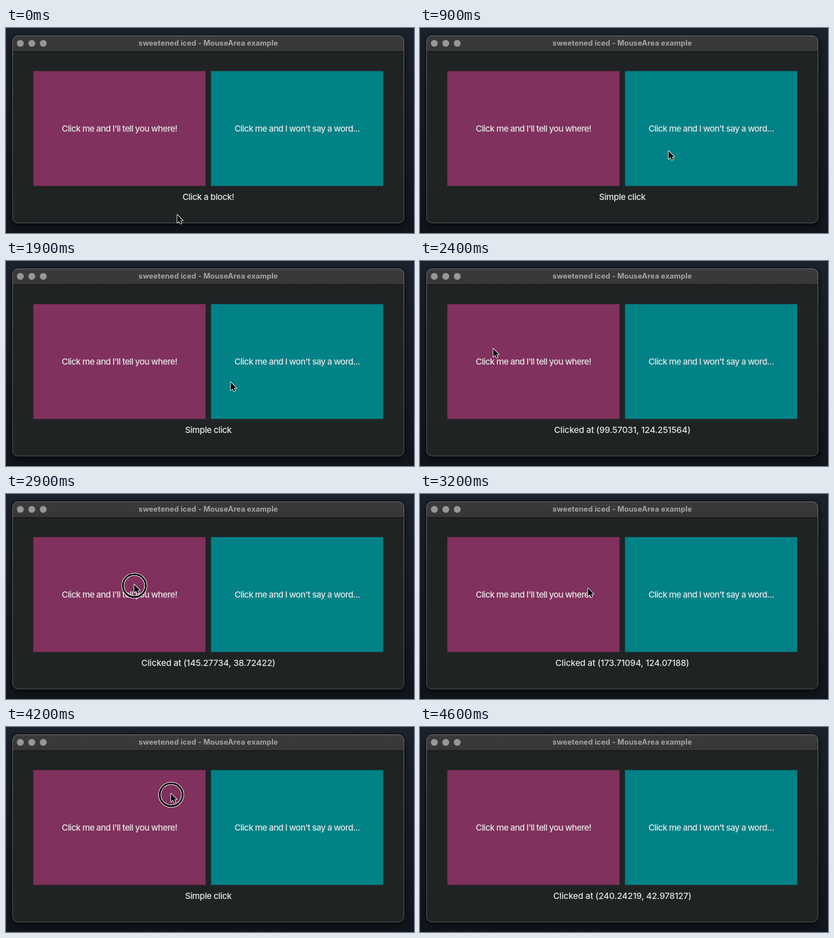
An HTML page with a canvas for the animation above (5.02 s loop, 712x360 px).

```html
<!DOCTYPE html>
<html lang="en">
<head>
<meta charset="utf-8">
<title>MouseArea example</title>
<style>
  html, body { margin: 0; width: 100%; height: 100%; overflow: hidden; background: #181d27; }
  canvas { display: block; width: 712px; height: 360px; }
</style>
</head>
<body>
<canvas id="stage"></canvas>
<script>
const W = 712, H = 360, LOOP = 5020;
const STEP = 100, TRAVEL = 300;
const canvas = document.getElementById('stage');
const ctx = canvas.getContext('2d');
const dpr = window.devicePixelRatio || 1;
canvas.width = W * dpr;
canvas.height = H * dpr;

const left = {
  x: 48, y: 76, color: '#80315d', text: "Click me and I'll tell you where!",
  reply: (x, y) => `Clicked at (${x}, ${y})`
};
const right = {
  x: 358, y: 76, color: '#018287', text: "Click me and I won't say a word...",
  reply: () => 'Simple click'
};

const move = (t, x, y) => ({ t, x, y });
const drag = (t, x, y) => ({ t, x, y, press: true });
const click = (t, block, x, y) =>
  ({ t, x: block.x + x, y: block.y + y, press: true, note: block.reply(x, y) });

// Where the pointer has to be, and when
const stops = [
  move(0, 299, 330),
  click(800, right, 76, 142),
  click(1400, right, 73, 36),
  click(1600, right, 120, 144),
  click(2100, left, 99.57031, 124.251564),
  move(2400, 128, 156),
  move(2500, 68, 121),
  click(2700, left, 145.27734, 38.72422),
  drag(2900, 224, 161),
  click(3100, left, 173.71094, 124.07188),
  move(3300, 365, 135),
  move(3700, 365, 135),
  move(3800, 451, 93),
  click(3900, right, 97, 31),
  click(4200, left, 240.24219, 42.978127),
  move(4500, 312, 89)
];

const clamp = v => Math.min(1, Math.max(0, v));
const smooth = k => k * k * (3 - 2 * k);
const mix = (a, b, k) => a + (b - a) * k;

function label(text, x, y, font, color, spacing) {
  ctx.font = font + ' Inter, "Open Sans", sans-serif';
  ctx.letterSpacing = spacing + 'px';
  ctx.fillStyle = color;
  ctx.textAlign = 'center';
  ctx.textBaseline = 'alphabetic';
  ctx.fillText(text, x, y);
}

const bodyText = (text, x, y, spacing) => label(text, x, y, '500 15px', '#e6e6e6', spacing);

function roundRect(x, y, w, h, r) {
  ctx.beginPath();
  ctx.roundRect(x, y, w, h, r);
}

function circle(x, y, r) {
  ctx.beginPath();
  ctx.arc(x, y, r, 0, Math.PI * 2);
}

function vertical(y0, y1, from, to) {
  const g = ctx.createLinearGradient(0, y0, 0, y1);
  g.addColorStop(0, from);
  g.addColorStop(1, to);
  return g;
}

function drawWindow() {
  ctx.fillStyle = vertical(0, H, '#1b222d', '#12151d');
  ctx.fillRect(0, 0, W, H);

  ctx.save();
  ctx.shadowColor = 'rgba(0,0,0,.6)';
  ctx.shadowBlur = 14 * dpr;
  ctx.shadowOffsetY = 5 * dpr;
  ctx.fillStyle = '#202324';
  roundRect(11, 13, 684, 330, 10);
  ctx.fill();
  ctx.restore();

  ctx.save();
  roundRect(11, 13, 684, 330, 10);
  ctx.clip();
  ctx.fillStyle = vertical(13, 41, '#3b3b3b', '#363636');
  ctx.fillRect(11, 13, 684, 28);
  ctx.fillStyle = '#0c0d0d';
  ctx.fillRect(11, 41, 684, 1);
  ctx.restore();

  ctx.lineWidth = 1;
  ctx.strokeStyle = '#05070a';
  roundRect(10.5, 12.5, 685, 331, 10.5);
  ctx.stroke();
  ctx.strokeStyle = vertical(13, 343, '#747474', '#58595a');
  roundRect(11.5, 13.5, 683, 329, 9.5);
  ctx.stroke();

  ctx.fillStyle = '#979797';
  for (let i = 0; i < 3; i++) {
    circle(25 + 20 * i, 27, 6);
    ctx.fill();
  }
  label('sweetened iced - MouseArea example', 353, 31, '700 12.8px', '#a5a5a5', 0.14);
}

function drawBlock({ x, y, color, text }) {
  ctx.fillStyle = color;
  ctx.fillRect(x - 0.3, y - 0.3, 300.6, 201.6);
  bodyText(text, x + 150, 182, -0.62);
}

function drawRing(x, y) {
  circle(x, y, 20);
  for (const [color, width] of [['#fff', 5], ['#000', 3]]) {
    ctx.strokeStyle = color;
    ctx.lineWidth = width;
    ctx.stroke();
  }
}

const arrow = new Path2D('M.8 1V15L4 12L6.4 16.9L8.6 15.9L6.4 11.2H10.7Z');

function drawArrow(x, y) {
  ctx.save();
  ctx.translate(x - 1, y - 3);
  ctx.strokeStyle = '#fff';
  ctx.lineWidth = 1.8;
  ctx.lineJoin = 'round';
  ctx.stroke(arrow);
  ctx.fillStyle = '#000';
  ctx.fill(arrow);
  ctx.restore();
}

// The pointer rests at a stop, then glides so as to reach the next in time
function drawPointer(t) {
  const a = stops.findLast(s => s.t <= t);
  const b = stops.find(s => s.t > t);
  if (!b && t >= a.t + STEP) return;
  let { x, y } = a;
  if (b) {
    const from = Math.max(a.t, b.t - TRAVEL);
    const k = smooth(clamp((t - from) / (b.t - from)));
    x = mix(a.x, b.x, k);
    y = mix(a.y, b.y, k);
  }
  if (a.press && t < a.t + STEP) drawRing(x, y);
  drawArrow(x, y);
}

function render(time) {
  const t = Math.floor(time / STEP) * STEP;
  ctx.setTransform(dpr, 0, 0, dpr, 0, 0);
  drawWindow();
  drawBlock(left);
  drawBlock(right);
  const last = stops.findLast(s => s.note && s.t + STEP <= t);
  const text = last ? last.note : 'Click a block!';
  bodyText(text, 353, 302, /\d/.test(text) ? -0.12 : -0.4);
  drawPointer(t);
}

const start = performance.now();
function tick() {
  render((performance.now() - start) % LOOP);
  requestAnimationFrame(tick);
}
tick();
</script>
</body>
</html>
```
